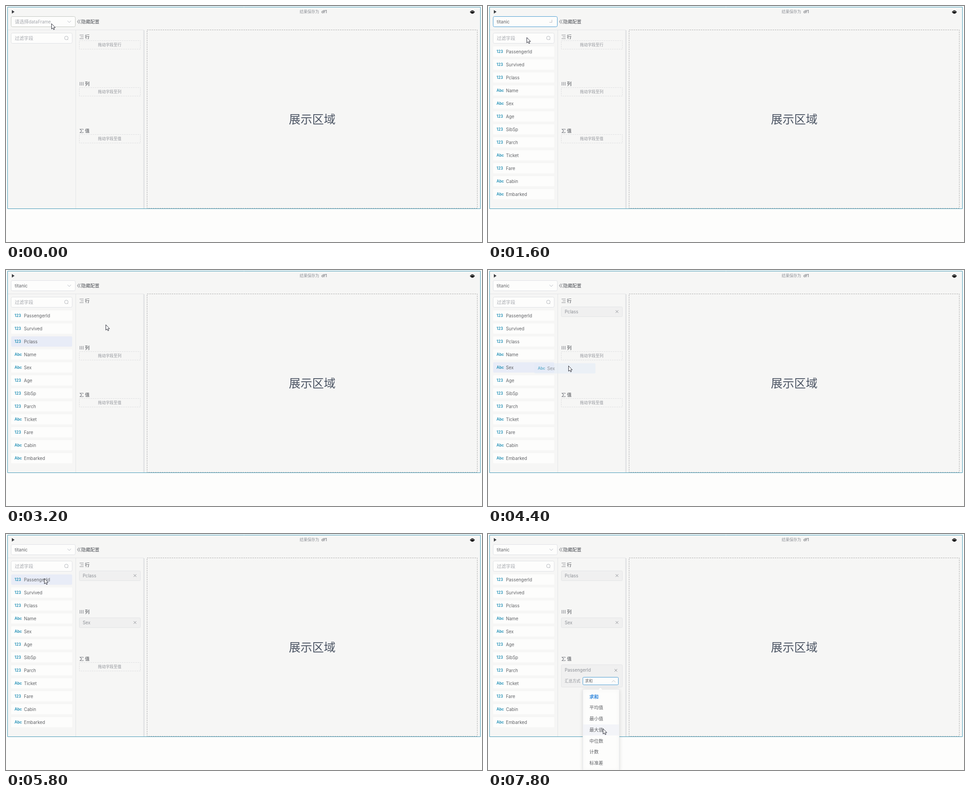
Animation of 1061 by 528 pixels, one loop 8 s. Source, as an HTML page with a canvas:

```html
<!DOCTYPE html>
<html lang="zh-CN">
<head>
<meta charset="utf-8">
<title>透视表配置</title>
<style>
  html, body { margin: 0; width: 100%; height: 100%; overflow: hidden; background: #fdfdfc; }
  canvas { display: block; }
</style>
</head>
<body>
<canvas id="stage" width="1061" height="528"></canvas>
<script>
const ctx = document.getElementById('stage').getContext('2d');
const LOOP = 8000, STEP = 200;
const FAMILY = 'Inter, "Noto Sans CJK SC", "Noto Sans CJK", sans-serif';
const PANEL = '#f6f6f5', WHITE = '#fdfdfc', BLUE = '#4a9cd2';

const fields = ['PassengerId', 'Survived', 'Pclass', 'Name', 'Sex', 'Age',
  'SibSp', 'Parch', 'Ticket', 'Fare', 'Cabin', 'Embarked'];
const textFields = ['Name', 'Sex', 'Ticket', 'Cabin', 'Embarked'];
const summaries = ['求和', '平均值', '最小值', '最大值', '中位数', '计数', '标准差'];
const zones = [['行', 69], ['列', 174], ['值', 279.5]];

// A field is pressed, enters its zone, then becomes a chip there.
const drags = [
  { field: 2, zone: 0, press: 2800, enter: 3200, drop: 3400 },
  { field: 4, zone: 1, press: 4000, enter: 4800, drop: 5000 },
  { field: 0, zone: 2, press: 5800, enter: 6800, drop: 7000 },
];

// Pointer way points: time, x, y
const route = [
  [0, 101, 39], [600, 101, 39], [1000, 86, 70], [1600, 86, 70], [2000, 120, 108],
  [2600, 86, 155], [2800, 85, 155], [3200, 222, 122], [3400, 208, 134],
  [3800, 88, 200], [4000, 87, 212], [4400, 179, 214], [4800, 178, 185],
  [5200, 173, 181], [5600, 95, 110], [5800, 85, 99], [6200, 190, 246],
  [6600, 221, 327], [7000, 240, 329], [7400, 252, 329], [7800, 256, 435],
];

function pointerAt(t) {
  const i = route.findIndex(p => p[0] > t);
  if (i < 0) return route.at(-1).slice(1);
  const [a, b] = [route[i - 1], route[i]];
  const k = (t - a[0]) / (b[0] - a[0]);
  return [1, 2].map(n => Math.round(a[n] + (b[n] - a[n]) * k));
}

function text(str, x, y, size, color, weight = 400) {
  ctx.font = `${weight} ${size}px ${FAMILY}`;
  ctx.fillStyle = color;
  ctx.fillText(str, x, y + size * 0.36);
}

function box(x, y, w, h, { fill, stroke, dash = [], r = 2 }) {
  ctx.beginPath();
  ctx.roundRect(x + 0.5, y + 0.5, w, h, r);
  if (fill) { ctx.fillStyle = fill; ctx.fill(); }
  if (stroke) {
    ctx.setLineDash(dash);
    ctx.strokeStyle = stroke;
    ctx.lineWidth = 1;
    ctx.stroke();
    ctx.setLineDash([]);
  }
}

function path(d, x, y, { fill, stroke, width = 1, angle = 0 }) {
  const p = new Path2D(d);
  ctx.save();
  ctx.translate(x, y);
  ctx.rotate(angle);
  if (fill) { ctx.fillStyle = fill; ctx.fill(p); }
  if (stroke) { ctx.strokeStyle = stroke; ctx.lineWidth = width; ctx.stroke(p); }
  ctx.restore();
}

const chevron = (x, y, angle) => path('M-4-2 0 2 4-2', x, y, { stroke: '#b9bcc2', angle });
const cross = (x, y) => path('M-3-3 3 3M3-3-3 3', x, y, { stroke: '#8f9297' });

function fieldRow(i, x, y, fill) {
  box(x, y, 136, 23, { fill });
  const type = textFields.includes(fields[i]) ? 'Abc' : '123';
  text(type, x + 8, y + 12.4, 8.6, '#1c8db4', 600);
  text(fields[i], x + 29, y + 12.2, 9.9, '#606266');
}

function menu(x, y, w, items, tipX, hover, selected, open) {
  ctx.save();
  ctx.globalAlpha = open;
  ctx.translate(0, y);
  ctx.scale(1, 0.6 + 0.4 * open);
  ctx.shadowColor = 'rgba(0,0,0,.13)';
  ctx.shadowBlur = 8;
  ctx.shadowOffsetY = 1;
  box(x, 0, w, items.length * 24.7 + 9, { fill: WHITE, stroke: '#e9eaed' });
  ctx.shadowColor = 'transparent';
  path('M-5 1.5 0-4 5 1.5', tipX, 0, { fill: WHITE, stroke: '#e9eaed' });
  items.forEach((item, i) => {
    const mid = 17 + i * 24.7;
    if (i === hover) {
      ctx.fillStyle = '#f3f4f8';
      ctx.fillRect(x + 1, mid - 12, w - 1, 24.5);
    }
    const on = i === selected;
    text(item, x + 15, mid, /[a-z]/.test(item) ? 9.9 : 10.3, on ? '#2f86dc' : '#606266', on ? 700 : 400);
  });
  ctx.restore();
}

function drawFrame() {
  ctx.fillStyle = '#fdfdfc';
  ctx.fillRect(0, 0, 1061, 528);
  box(3, 2, 1054, 451, { fill: PANEL, stroke: '#3f97b4', r: 0 });
  ctx.fillStyle = '#e3e4e6';
  ctx.fillRect(4, 53, 303, 1);
  ctx.fillRect(155, 54, 1, 399);
  ctx.fillRect(306, 54, 3, 399);
  box(314, 53, 736, 399, { stroke: '#a8a8a8', dash: [3, 2], r: 0 });

  path('M0 0 6 4 0 8Z', 13, 9, { fill: '#3c3e42' });
  text('结果保存为', 654.5, 13, 8.7, '#909399');
  text('df1', 703, 13, 8.9, '#55585e');
  path('M-5.5 0Q0-7.5 5.5 0Q0 7.5-5.5 0Z', 1039.5, 13.5, { fill: '#111' });
  path('M-4 .3Q0-3 4 .3', 1039.5, 13.5, { stroke: '#eee', width: 0.8 });
  path('M3.5 0 0 4.5 3.5 9M7 0 3.5 4.5 7 9', 159, 30.5, { stroke: '#6b6e74' });
  text('隐藏配置', 167.5, 35, 10.2, '#505359');
  text('展示区域', 630.5, 253.5, 26, '#4c5564', 350);
}

function drawSelect(t) {
  const stroke = t < 400 ? '#c4c8c2' : t < 2800 ? BLUE : '#dfe1e5';
  box(11, 23, 143, 23, { fill: WHITE, stroke, r: 3 });
  if (t < 1600) {
    text('请选择', 19.5, 35, 10.4, '#a4a7ad');
    text('dataFrame', 50.5, 35, 9.9, '#a4a7ad');
  } else {
    text('titanic', 19.5, 35, 10, '#606266');
  }
  const turn = t < 400 ? 0 : t < 600 ? 0.75 : t < 1600 ? 1 : t < 1800 ? 0.25 : 0;
  chevron(141, 35, -Math.PI * turn);
}

function drawZone([name, mid], index, t) {
  const icons = ['M0-4H9M2.5 0H9M0 4H9', 'M1-4V4M4.5-4V4M8-4V4', 'M8-2.5V-4H1L5 0 1 4H8V2.5'];
  path(icons[index], 164, mid, { stroke: '#85888e', width: 1.2 });
  text(name, 176, mid, 10.3, '#3f4248', 500);

  const drag = drags[index], top = Math.floor(mid);
  if (t < drag.enter) {
    box(163, top + 8, 136, 19, { stroke: '#dcdddf', dash: [3, 2], r: 0 });
    text('拖动字段至' + name, 205, top + 18, 8.7, '#909399');
  } else if (t >= drag.drop) {
    const isValue = index === 2;
    box(163, top + 13, 136, isValue ? 50 : 22, { fill: '#f0f0f0', stroke: '#e3e4e6' });
    text(fields[drag.field], 171, top + (isValue ? 25.7 : 24.2), 9.9, '#8d9096');
    cross(isValue ? 285 : 287.5, top + (isValue ? 26 : 24));
    if (isValue) drawSummary(t);
  }
}

function drawSummary(t) {
  text('汇总方式', 171, 329, 8.7, '#8d9096');
  box(211, 320, 79, 17, { fill: WHITE, stroke: t < 7200 ? '#dfe1e5' : BLUE });
  text('求和', 216, 329, 8.7, '#606266');
  chevron(280, 329.5, t < 7400 ? 0 : Math.PI);
}

function draw(t) {
  const [px, py] = pointerAt(t);
  drawFrame();
  drawSelect(t);
  box(11, 60, 136, 23, { fill: WHITE, stroke: '#dfe1e4', r: 3 });
  text('过滤字段', 19.5, 72, 10.3, '#a4a7ad');
  path('M4 0A4 4 0 1 0-4 0A4 4 0 1 0 4 0M2.5 3 4 4.5', 134.5, 71.5, { stroke: '#b0b3b9' });

  const active = drags.find(d => t >= d.press && t < d.drop);
  if (t >= 1600) {
    fields.forEach((_, i) =>
      fieldRow(i, 11, 90 + 29 * i, active?.field === i ? '#e8ecf7' : WHITE));
  }
  zones.forEach((zone, i) => drawZone(zone, i, t));

  if (active && t > active.press && t < active.enter) {
    const [gx, gy] = pointerAt(active.press);
    ctx.globalAlpha = 0.65;
    fieldRow(active.field, 11 + px - gx, 90 + 29 * active.field + py - gy, 'rgba(226,236,247,.8)');
    ctx.globalAlpha = 1;
  }
  if (t >= 400 && t < 1600) {
    menu(11, 55, 142, ['titanic'], 42, py > 58 ? 0 : -1, -1, t < 600 ? 0.5 : 1);
  }
  if (t >= 7400) {
    const hover = py > 350 ? Math.floor((py - 352) / 24.7) : 0;
    menu(211, 347, 81, summaries, 250.5, hover, 0, t < 7600 ? 0.6 : 1);
  }
  path('M0 0V12L2.8 9.5 4.7 13.6 6.6 12.7 4.8 8.8H8.4Z', px + 0.5, py + 0.5,
    { fill: '#fff', stroke: '#2b2d38' });
}

function tick(now) {
  draw(Math.floor(now % LOOP / STEP) * STEP);
  requestAnimationFrame(tick);
}
requestAnimationFrame(tick);
</script>
</body>
</html>
```
